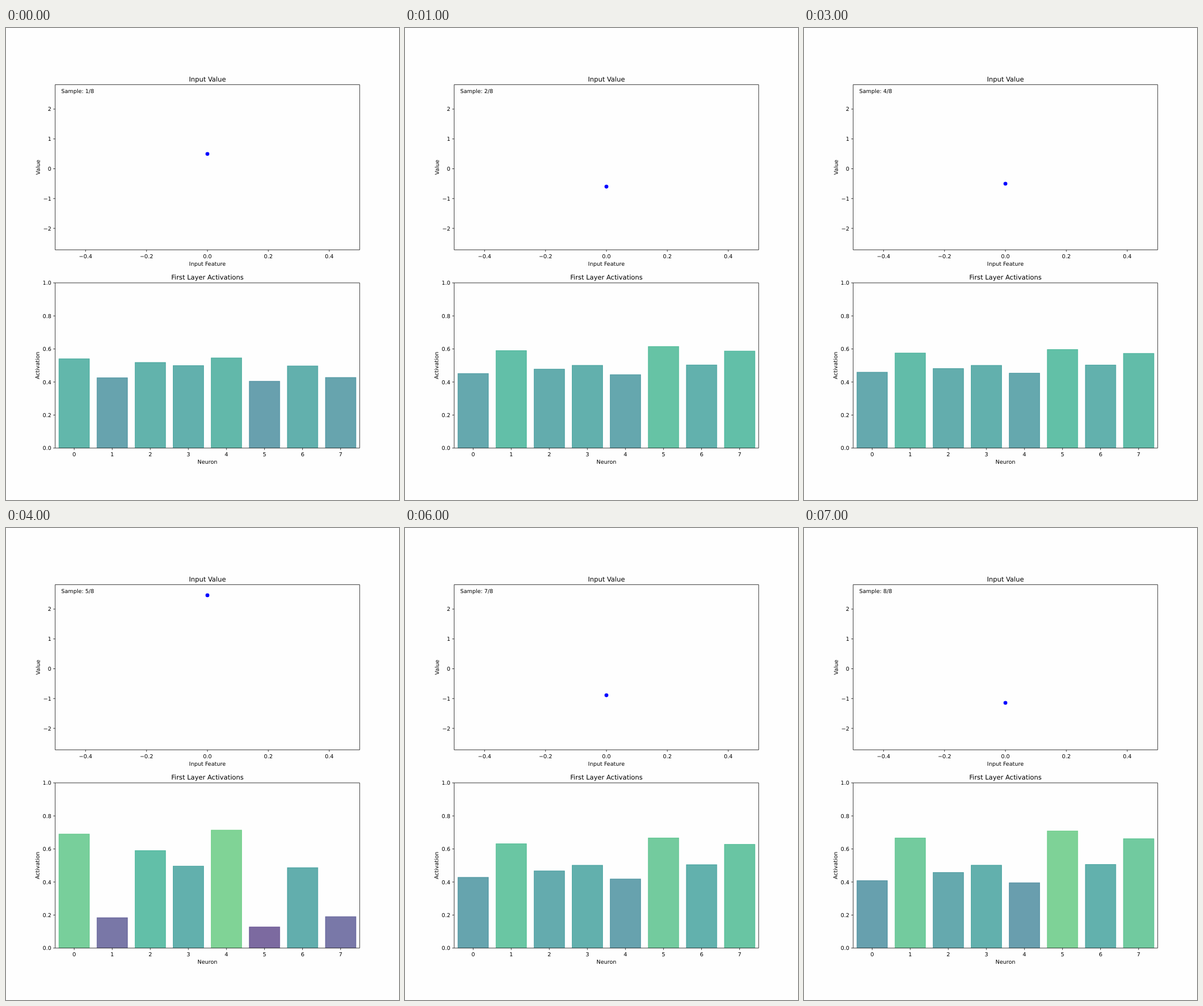
Animation of 683x820 px, one loop 8 s. Source, as an HTML page:

```html
<!DOCTYPE html>
<html lang="en">
<head>
<meta charset="utf-8">
<title>Layer activations</title>
<style>
  html, body { margin: 0; width: 100%; height: 100%; overflow: hidden; background: #fefefe; }
  svg { display: block; width: 683px; height: 820px; }
  text { font: 9.49px "DejaVu Sans", sans-serif; text-rendering: geometricPrecision; }
  .title { font-size: 11.38px; }
  .line { fill: none; stroke: #000; stroke-width: 0.76; }
  .bar { fill-opacity: 0.7; stroke-opacity: 0.7; stroke-width: 0.95; }
</style>
</head>
<body>
<svg id="stage" viewBox="0 0 683 820"></svg>
<script>
const STEP = 1000;
const inputs = [0.4967, -0.6006, -0.8392, -0.5018, 2.4632, -1.6075, -0.8895, -1.1430];
const weights = [0.325, -0.605, 0.148, -0.006, 0.3715, -0.779, -0.0215, -0.588];
const viridis = [[68, 1, 84], [72, 36, 117], [65, 68, 135], [53, 95, 141], [42, 120, 142],
  [33, 145, 140], [34, 168, 132], [68, 191, 112], [122, 209, 81], [189, 223, 38], [253, 231, 37]];

const left = 85.4, right = 614.7, width = right - left, height = 287;
const middle = (left + right) / 2;
const stage = document.getElementById('stage');

function add(tag, attrs, text = '') {
  const el = document.createElementNS('http://www.w3.org/2000/svg', tag);
  for (const key in attrs) el.setAttribute(key, attrs[key]);
  el.textContent = text;
  return stage.appendChild(el);
}

const label = (text, x, y, anchor = 'middle', more = {}) =>
  add('text', { x, y, 'text-anchor': anchor, ...more }, text);

const number = (value, digits) => value.toFixed(digits).replace('-', '\u2212');

function drawAxes({ top, title, xName, yName, yNameX, xTicks, yTicks, xDigits, yDigits, xAt, yAt }) {
  const bottom = top + height;
  let path = `M${left} ${top}H${right}V${bottom}H${left}Z`;
  for (const v of xTicks) {
    path += `M${xAt(v)} ${bottom}v3.32`;
    label(number(v, xDigits), xAt(v), bottom + 14.1);
  }
  for (const v of yTicks) {
    path += `M${left} ${yAt(v)}h-3.32`;
    label(number(v, yDigits), left - 6.64, yAt(v) + 3.5, 'end');
  }
  add('path', { d: path, class: 'line' });
  label(title, middle, top - 5.6, 'middle', { class: 'title' });
  label(xName, middle, bottom + 27.1);
  label(yName, 0, 0, 'middle', { transform: `translate(${yNameX} ${top + height / 2}) rotate(-90)` });
}

const valueTop = 98.4, activationTop = 442.8, base = activationTop + height;
const yMin = -2.7197, yMax = 2.8202;
const valueY = v => valueTop + height * (yMax - v) / (yMax - yMin);
const activationY = a => base - a * height;
const neuronX = n => left + width * (n + 0.5) / 8;

// Bars go in first so that the frame lines cover their lower edge.
const clip = add('clipPath', { id: 'plot' });
clip.append(add('rect', { x: left, y: activationTop, width, height }));
const bars = weights.map((w, n) => add('rect', {
  class: 'bar', x: neuronX(n) - width / 20, width: width / 10, 'clip-path': 'url(#plot)'
}));

drawAxes({
  top: valueTop, title: 'Input Value', xName: 'Input Feature', yName: 'Value', yNameX: 58.7,
  xTicks: [-0.4, -0.2, 0, 0.2, 0.4], yTicks: [-2, -1, 0, 1, 2], xDigits: 1, yDigits: 0,
  xAt: v => middle + v * width, yAt: valueY
});
drawAxes({
  top: activationTop, title: 'First Layer Activations', xName: 'Neuron', yName: 'Activation', yNameX: 57.7,
  xTicks: weights.map((w, n) => n), yTicks: [0, 0.2, 0.4, 0.6, 0.8, 1], xDigits: 0, yDigits: 1,
  xAt: neuronX, yAt: activationY
});
const dot = add('circle', { cx: middle, r: 3.32, fill: '#00f' });
const counter = label('', 96, 112.8, 'start');

function color(a) {
  const i = Math.floor(a * 10), part = a * 10 - i;
  return `rgb(${viridis[i].map((c, k) => Math.round(c + (viridis[i + 1][k] - c) * part))})`;
}

function show(sample) {
  const x = inputs[sample];
  dot.setAttribute('cy', valueY(x));
  counter.textContent = `Sample: ${sample + 1}/${inputs.length}`;
  bars.forEach((bar, n) => {
    const a = 1 / (1 + Math.exp(-weights[n] * x));
    bar.setAttribute('y', activationY(a));
    bar.setAttribute('height', a * height);
    bar.setAttribute('fill', color(a));
    bar.setAttribute('stroke', color(a));
  });
}

const start = performance.now();
let current = 0;
show(current);
function tick() {
  const sample = Math.floor((performance.now() - start) / STEP) % inputs.length;
  if (sample !== current) show(current = sample);
  requestAnimationFrame(tick);
}
requestAnimationFrame(tick);
</script>
</body>
</html>
```
